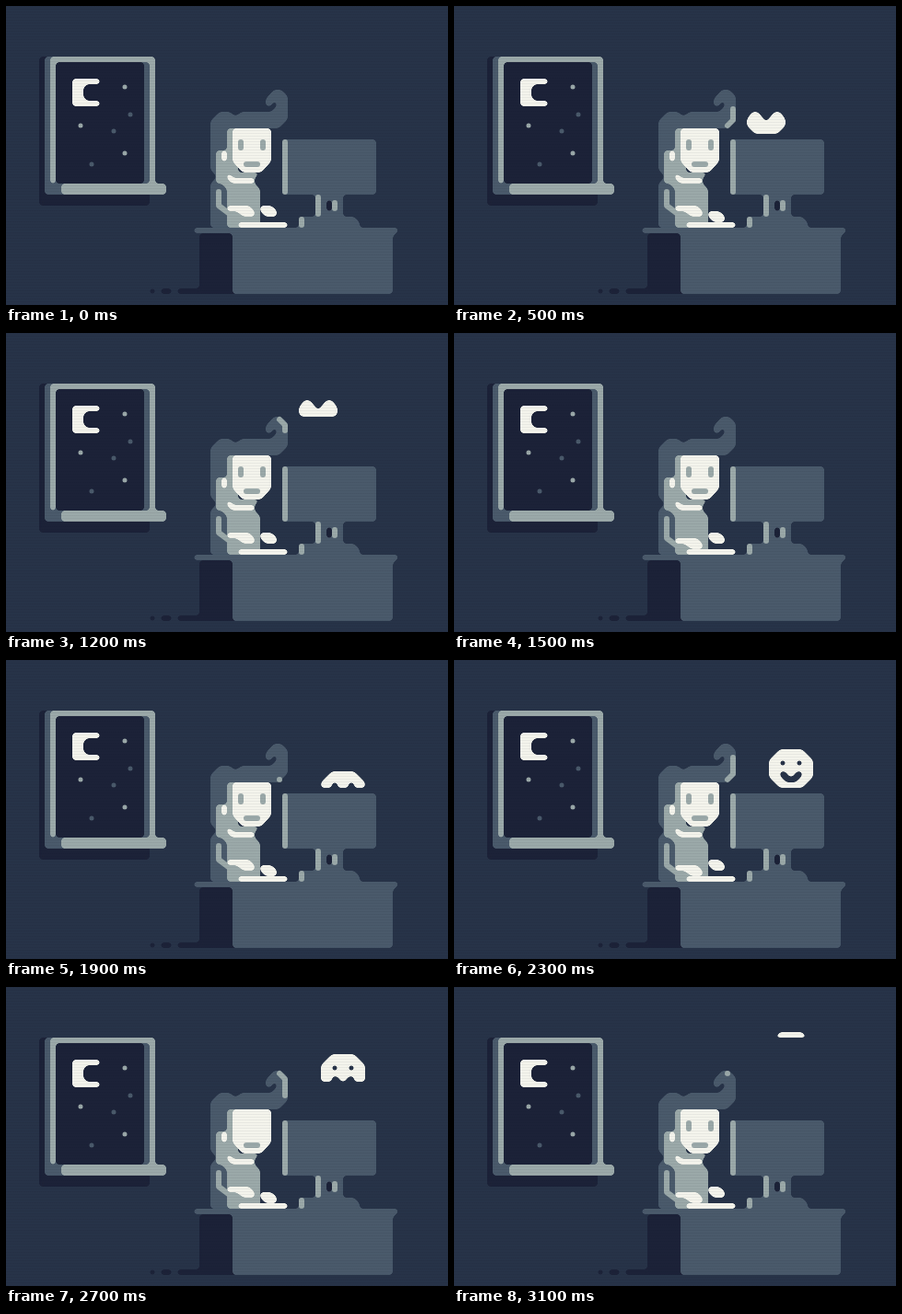
These frames come from a looping animation (480x325 px, 3200 ms). An HTML page:

```html
<!DOCTYPE html>
<html lang="en">
<head>
<meta charset="utf-8">
<title>Night desk</title>
<style>
  html, body { margin: 0; width: 100%; height: 100%; overflow: hidden; background: #273348; }
  svg { display: block; width: 480px; height: 325px; }
  .dark { fill: #1c2238; }
  .mid { fill: #4a5a6b; }
  .light { fill: #9ba9a9; }
  .white { fill: #f4f4ec; }
  .line { fill: none; stroke: #9ba9a9; stroke-width: 6; stroke-linecap: round; stroke-linejoin: round; }
  .soft { filter: url(#melt); }
  .scanlines {
    position: fixed; inset: 0;
    background: repeating-linear-gradient(rgba(10, 16, 30, .05) 0 1px, transparent 1px 3px);
  }
</style>
</head>
<body>
<svg viewBox="0 0 480 325">
  <defs>
    <!-- Blur and threshold: rounds every corner of a flat shape -->
    <filter id="melt" filterUnits="userSpaceOnUse" x="-10" y="-10" width="500" height="345"
            color-interpolation-filters="sRGB">
      <feGaussianBlur stdDeviation="2"/>
      <feColorMatrix values="1 0 0 0 0  0 1 0 0 0  0 0 1 0 0  0 0 0 9 -4"/>
    </filter>
    <clipPath id="window-rows"><rect id="rows" width="48" height="0"/></clipPath>
  </defs>

  <!-- Window -->
  <rect class="dark soft" x="36" y="55" width="120" height="162"/>
  <rect class="mid soft" x="42" y="55" width="114" height="150"/>
  <rect class="dark soft" x="54" y="61" width="96" height="132"/>
  <path class="light soft" d="M48 193V55H162V193H156V61H54V193z M60 193H174V205H60z"/>
  <path class="white soft" d="M72 79H102V85H88L84 89V99L88 103H102V109H72z"/>
  <path class="line" stroke-width="5" style="stroke-width: 5" d="M129 88h0M81 130h0M129 160h0"/>
  <path class="line" style="stroke: #4a5a6b; stroke-width: 5" d="M135 118h0M117 136h0M93 172h0"/>

  <!-- Desk and monitor -->
  <path class="dark soft" d="M210 247H250V313H186V307H210z M168 307h12v6h-12z M156 307h6v6h-6z"/>
  <path class="mid soft" d="M204 241H426V245L420 250V313H246V247H204z
    M336 205H366V229H378L384 235V241H318V229H336z M300 145H402V205H300z"/>
  <rect class="dark soft" x="348" y="211" width="6" height="12"/>
  <path class="line" d="M303 148V202M339 208V226M357 214V220M321 232V238"/>

  <!-- Hair and back -->
  <path class="mid soft" d="M222 125L232 115H243L249 120L256 115H288L294 109V104H290L288 109H282V101
    L291 91H299L306 98V123L296 133H246V241H222V193L228 187V184L222 178z"/>
  <path class="line" id="glow"/>

  <!-- Body and face -->
  <path class="light soft" d="M240 133H252V181H276L270 187V193L276 199V241H240V199L234 193H228V157H240z"/>
  <path class="line" id="elbow"/>
  <path class="white soft" d="M246 133H288V169L277 181H257L246 169z M234 157H240V169H234z
    M240 181L248 187H270V193H246L240 188z"/>
  <path class="line" id="eyes" d="M255 148V154M279 148V154"/>
  <path class="line" d="M261 172H273"/>
  <rect class="white soft" x="252" y="235" width="54" height="6"/>
  <path class="white soft" id="forearm" d="M240 217H264L270 223V229H258L250 223H240z"/>
  <path class="white soft" id="hand" d="M276 217H288L294 222V229H282L276 223z"/>

  <g class="soft">
    <path class="white" id="icon" fill-rule="evenodd" clip-path="url(#window-rows)"/>
  </g>
</svg>
<div class="scanlines"></div>
<script>
const CELL = 6, STEP = 100, STEPS = 32, SCREEN_TOP = 139;

// Each icon is drawn from its own top left corner; rows is its height in cells.
const heart = {
  x: 318, rows: 6, start: 2,
  shape: 'M0 8L6 0H12L21 11L30 0H36L42 8V15L21 36L0 15z'
};
const smiley = {
  x: 342, rows: 7, start: 17,
  shape: `M12 0H36L48 12V30L36 42H12L0 30V12z M12 12h6v6h-6z M30 12h6v6h-6z
    M12 24H18L22 30H26L30 24H36V29L29 36H19L12 29z`
};

const set = (id, attributes) => {
  const node = document.getElementById(id);
  for (const name in attributes) node.setAttribute(name, attributes[name]);
};
const shiftDown = y => `translate(0 ${y})`;

// An icon climbs one cell per step out of the screen, then loses its rows from below.
function drawIcon({ x, rows, start, shape }, step) {
  const age = step - start;
  const shown = Math.max(0, Math.min(age + 1, rows, 2 * rows + 1 - age));
  set('rows', { height: shown * CELL });
  set('icon', { d: shape, transform: `translate(${x} ${SCREEN_TOP - (age + 1) * CELL})` });
}

// The glow climbs the right edge of the curl from foot to tip and leaves at the top.
function drawGlow(offset) {
  const points = [];
  for (let k = Math.max(0, -offset); k <= Math.min(6, 6 - offset); k++) {
    points.push(`${k % 6 ? 303 : 297} ${94 + k * CELL}`);
  }
  set('glow', { d: points.length ? `M${points.join('L')}h0` : '' });
}

// Every second step one hand presses a key: twice the near one, twice the far one.
function drawTyping(step) {
  const press = step % 2 * CELL;
  const nearTurn = (step + 1) % 8 < 4;
  const near = nearTurn ? press : 0;
  set('forearm', { transform: shiftDown(near) });
  set('hand', { transform: shiftDown(press - near) });
  set('elbow', { d: `M231 202V${217 + near}L243 ${226 + near}` });
}

function render(step) {
  const icon = step < STEPS / 2 ? heart : smiley;
  drawIcon(icon, step);
  drawGlow(step - icon.start - (icon === heart ? 6 : 8));
  drawTyping(step);
  set('eyes', { visibility: step === 27 ? 'hidden' : 'visible' });
}

const origin = performance.now();
let last = -1;
function tick() {
  const step = Math.floor((performance.now() - origin) / STEP) % STEPS;
  if (step !== last) render(last = step);
  requestAnimationFrame(tick);
}
tick();
</script>
</body>
</html>
```
